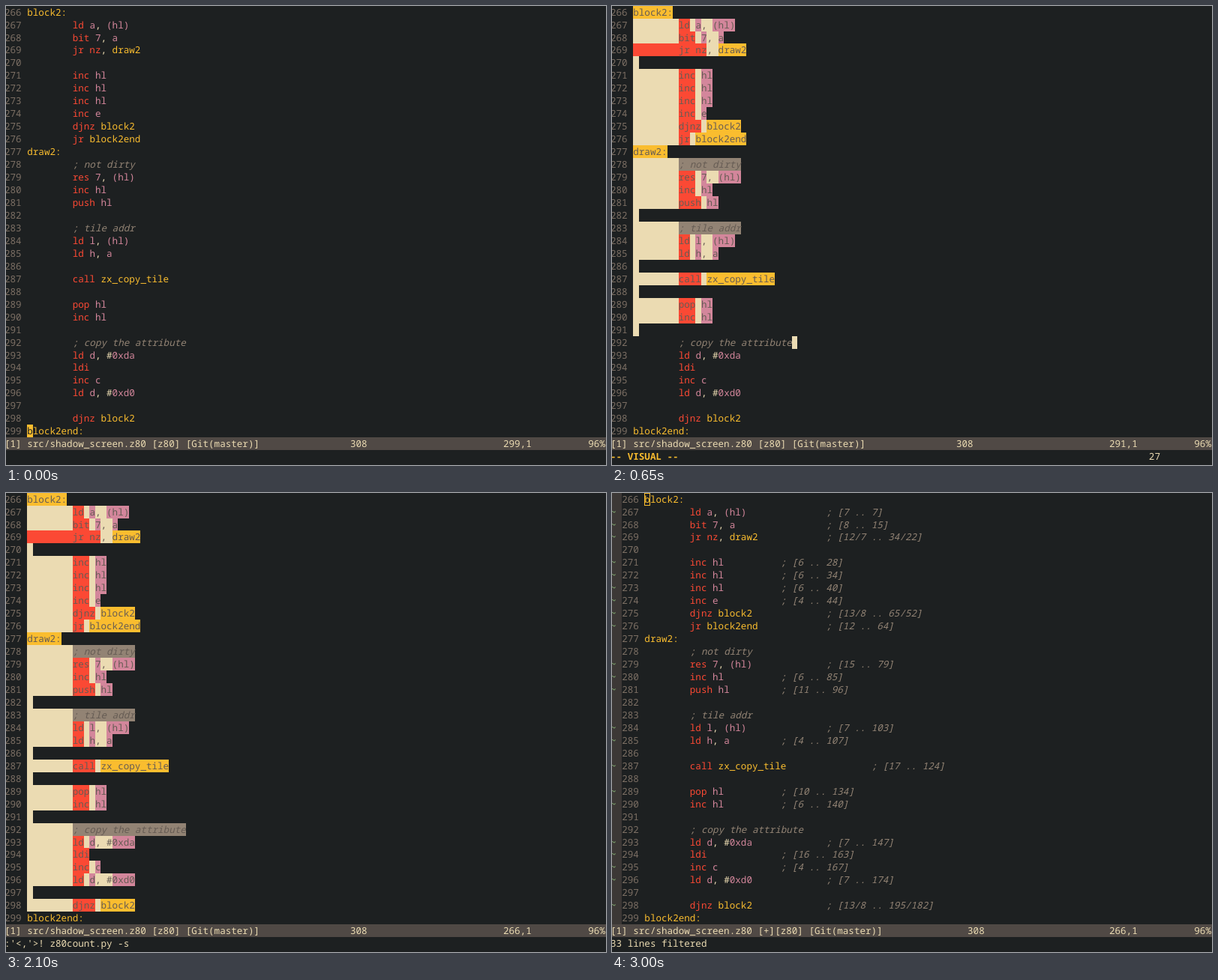
Recreate the animation shown at these times as an HTML page. Size 800x613 px, loop 3600 ms.

```html
<!DOCTYPE html>
<html lang="en">
<head>
<meta charset="utf-8">
<title>Cycle counts in the editor</title>
<style>
html, body { margin: 0; width: 100%; height: 100%; overflow: hidden; background: #1d2021; }
#screen {
  position: relative; width: 800px; height: 613px; overflow: hidden;
  background: #1d2021; color: #ebdbb2;
  font: 12.6px/17px "Noto Sans Mono", "DejaVu Sans Mono", monospace;
  text-rendering: geometricPrecision; font-variant-ligatures: none;
}
.row { position: absolute; left: -2px; width: 804px; height: 17px; white-space: pre; }
.row span, .row i, .row u, .row b { display: inline-block; height: 17px; vertical-align: top; }
.row u { color: #7c6f64; text-decoration: none; }
.row .sign { background: #3c3836; color: #8ec07c; font-weight: 400; }
span { color: var(--c); }
.plain { --c: #ebdbb2; }
.op { --c: #fb4934; }
.label { --c: #fabd2f; }
.arg { --c: #d3869b; }
.note { --c: #928374; font-style: italic; }
.sel span { color: #665c54; background: var(--c); }
.row i { font-style: normal; color: #1d2021; background: #ebdbb2; }
.row .block, .row .hollow { position: absolute; background: #fabd2f; }
.row .hollow { color: transparent; background: none; box-shadow: inset 0 0 0 1px #fabd2f; }
.status { background: #504945; }
.row .mode { color: #fabd2f; font-weight: bold; }
</style>
</head>
<body>
<div id="screen"></div>
<script>
// Each line: code, then the cycle note added by the filter.
const LINES = `block2:
ld a, (hl)|7 .. 7
bit 7, a|8 .. 15
jr nz, draw2|12/7 .. 34/22

inc hl|6 .. 28
inc hl|6 .. 34
inc hl|6 .. 40
inc e|4 .. 44
djnz block2|13/8 .. 65/52
jr block2end|12 .. 64
draw2:
; not dirty
res 7, (hl)|15 .. 79
inc hl|6 .. 85
push hl|11 .. 96

; tile addr
ld l, (hl)|7 .. 103
ld h, a|4 .. 107

call zx_copy_tile|17 .. 124

pop hl|10 .. 134
inc hl|6 .. 140

; copy the attribute
ld d, #0xda|7 .. 147
ldi|16 .. 163
inc c|4 .. 167
ld d, #0xd0|7 .. 174

djnz block2|13/8 .. 195/182
block2end:`.split('\n').map(line => line.split('|'));

const FIRST = 266, LOOP = 3600, INDENT = ' '.repeat(8);
const TOP = -0.4, PITCH = 16.96;
const DRAG = [4, 9, 14, 18, 22, 26, 30, 33];
const RANGE = ":'<,'>", FILTER = RANGE + '! z80count.py -s';
const OPERAND = /(\(hl\)|\b(?:hl|[acdehl]|7|0x\w+)\b)|(\w{4,})|([^\w(]+)/g;

const screen = document.getElementById('screen');
const escape = s => s.replace(/</g, '&lt;').replace(/>/g, '&gt;');
const span = (kind, s) => s ? `<span class="${kind}">${s}</span>` : '';

function paint(code) {
  if (!code) return '';
  if (code.endsWith(':')) return span('label', code);
  if (code[0] === ';') return span('plain', INDENT) + span('note', code);
  const op = code.match(/^(jr nz|\w+)/)[0];
  const head = op === 'jr nz' ? span('op', INDENT + op) : span('plain', INDENT) + span('op', op);
  return head + code.slice(op.length).replace(OPERAND, (s, arg, label) =>
    span(arg ? 'arg' : label ? 'label' : 'plain', s));
}

function cycleNote(code, cycles) {
  const end = 8 + code.length, column = (Math.floor(end / 8) + 2) * 8;
  return span('plain', ' '.repeat(column - end)) + span('note', `; [${cycles}]`);
}

function row(i, html, kind = '') {
  return `<div class="row ${kind}" style="top:${(PITCH * i + TOP).toFixed(2)}px">${html}</div>`;
}

function codeRow([code, cycles], i, s) {
  const selected = i < s.selected;
  let html = paint(code);
  if (s.filtered && cycles) html += cycleNote(code, cycles);
  if (selected && !code) html = span('plain', ' ');
  if (i === s.cursor) html = `<i class="${s.hollow ? 'hollow' : 'block'}">b</i>` + html;
  if (i === s.tail) html += '<i> </i>';
  const sign = s.signs ? `<b class="sign">${cycles ? '~ ' : '  '}</b>` : '';
  return row(i, `${sign}<u>${FIRST + i} </u>${html}`, selected ? 'sel' : '');
}

function statusText(s) {
  const flag = s.filtered ? '[+]' : '';
  return `[1] src/shadow_screen.z80 ${flag}[z80] [Git(master)]`
    .padEnd(s.filtered ? 63 : 61).concat('308')
    .padEnd(88).concat(s.pos)
    .padEnd(103).concat('96%');
}

function stateAt(t) {
  if (t < 400) return { cursor: 33, pos: '299,1', command: '' };
  if (t < 1750) {
    const step = Math.min(7, Math.floor((t - 400) / 50));
    const selected = DRAG[step], last = selected - 1;
    const tail = step < 7 ? selected : last;
    const code = LINES[last][0];
    const width = code ? code.length + (code.endsWith(':') ? 0 : 8) : 0;
    return {
      selected, tail, pos: `${FIRST + last},${width + 1}`,
      command: '<b class="mode">-- VISUAL --</b>' + ' '.repeat(83) + (tail + 1)
    };
  }
  if (t < 2200) {
    const typed = t < 1800 ? RANGE : t < 1900 ? RANGE + '!' : FILTER;
    return {
      selected: 33, pos: '266,1',
      command: escape(typed) + (t < 2100 ? '<i> </i>' : '')
    };
  }
  return {
    filtered: true, signs: t >= 2450, cursor: 0, hollow: t >= 3000,
    pos: '266,1', command: '33 lines filtered'
  };
}

let shown = '';
function draw(now) {
  const s = stateAt(now % LOOP);
  const key = JSON.stringify(s);
  if (key !== shown) {
    shown = key;
    screen.innerHTML = LINES.map((line, i) => codeRow(line, i, s)).join('')
      + row(34, statusText(s), 'status') + row(35, s.command);
  }
}

const start = performance.now();
function tick() {
  draw(performance.now() - start);
  requestAnimationFrame(tick);
}
tick();
</script>
</body>
</html>
```
